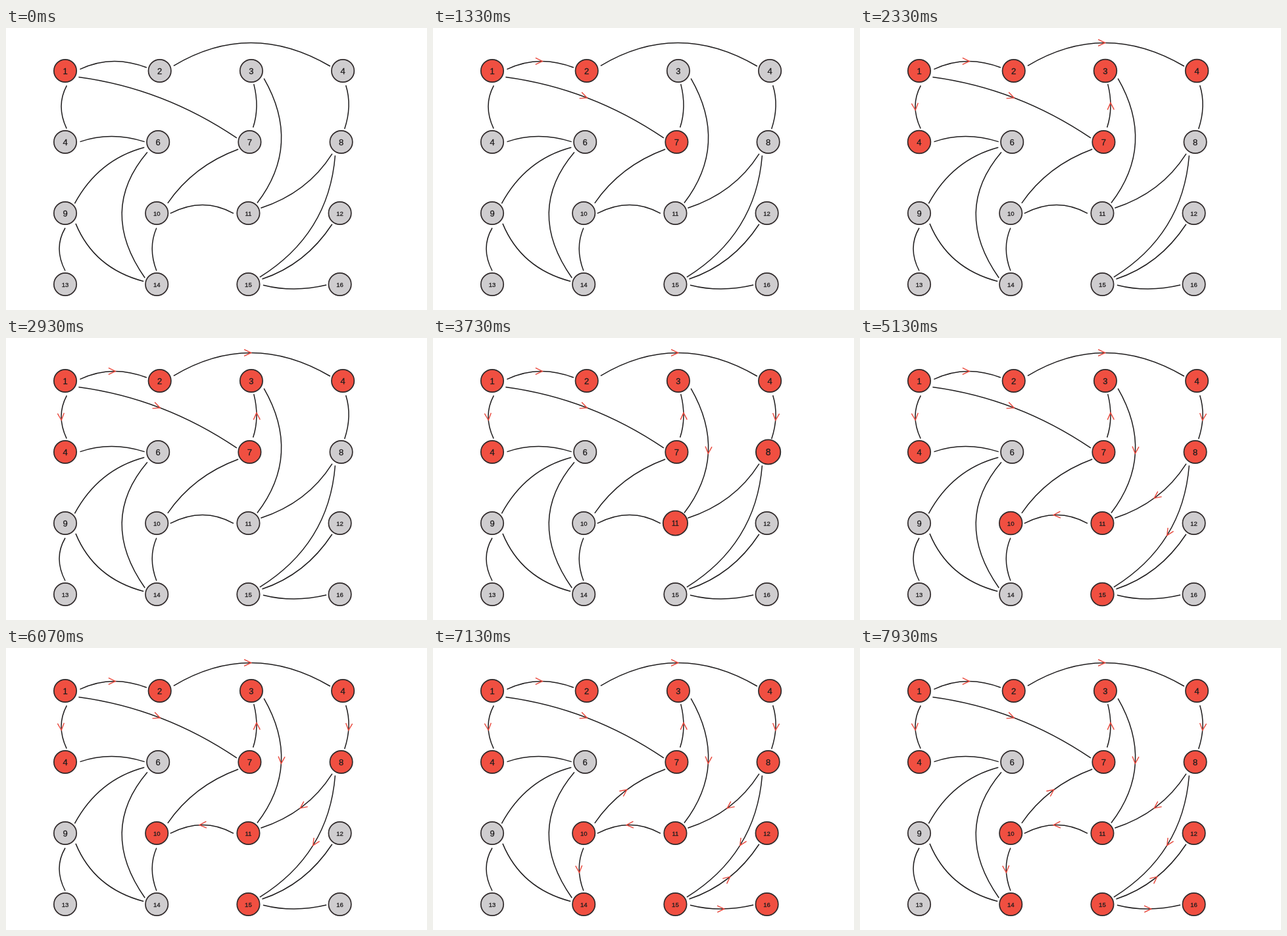
Recreate the animation shown at these times as an HTML page with a canvas. Size 640x428 px, loop 8000 ms.

```html
<!DOCTYPE html>
<html lang="en">
<head>
<meta charset="utf-8">
<title>Graph traversal</title>
<style>
html, body { margin: 0; width: 100%; height: 100%; overflow: hidden; background: #fff; }
canvas { display: block; width: 640px; height: 428px; }
</style>
</head>
<body>
<canvas id="stage"></canvas>
<script>
const canvas = document.getElementById('stage');
const ctx = canvas.getContext('2d');
const ratio = window.devicePixelRatio || 1;
canvas.width = 640 * ratio;
canvas.height = 428 * ratio;

const FPS = 15, TICKS = 120, PULSE = 6, GAP = 22.5;
const INK = '#1f1d1e', GREY = '#cfcdcf', RED = '#f04f41', ARROW = '#e8463a';

// Four by four grid; the upper rows lean slightly to the right.
const nodes = Array.from({ length: 16 }, (_, i) => {
  const row = i >> 2, col = i % 4;
  const lean = Math.max(0, 4.5 - 2.5 * row);
  return {
    label: i === 4 ? 4 : i + 1,
    x: 90 + (col && 139.2 * col + lean),
    y: 65 + 108 * row,
    start: i ? Infinity : -TICKS
  };
});

// Links are [from, to, bend, turn, skew]: bend in pixels to the left of the
// direction of travel, turn of both ends towards the bend in degrees.
const waves = [
  { start: 8, links: [[1, 2, 14.5, 10, -4], [1, 7, 13.6, -4]] },
  { start: 30, links: [[2, 4, 42.5, 20], [1, 5, -6, -6], [7, 3, -9.3, 12]] },
  { start: 52, links: [[3, 11, 47.8, 50, 10], [4, 8, 10.2, 13]] },
  { start: 77, links: [[8, 11, 17.8, 15], [8, 15, 33.4, 17, -8], [11, 10, -12.5, -1]] },
  { start: 101, links: [[10, 7, 12.6, 5], [10, 14, -7, 1], [15, 12, -18, 17], [15, 16, -7, 3]] },
  { start: Infinity, links: [[5, 6, 8.5, 1], [6, 9, -19.2, 12, 4], [6, 14, -54, 54, -8],
    [9, 14, -22.5, 16, -9], [9, 13, -9, 0]] }
];

function makeEdge([from, to, bend, turn, skew = 0], start) {
  const a = nodes[from - 1], b = nodes[to - 1];
  const angle = Math.atan2(b.y - a.y, b.x - a.x);
  const side = Math.sign(bend) * Math.PI / 180;
  const out = angle - side * (turn + skew);
  const back = angle + side * (turn - skew);
  const x0 = a.x + GAP * Math.cos(out), y0 = a.y + GAP * Math.sin(out);
  const x1 = b.x - (GAP - 2) * Math.cos(back), y1 = b.y - (GAP - 2) * Math.sin(back);
  const apexX = (a.x + b.x) / 2 + bend * Math.sin(angle);
  const apexY = (a.y + b.y) / 2 - bend * Math.cos(angle);
  b.start = Math.min(b.start, start);
  return {
    x0, y0, x1, y1, start,
    cx: 2 * apexX - (x0 + x1) / 2,
    cy: 2 * apexY - (y0 + y1) / 2,
    tip: .465 + 8 / Math.hypot(x1 - x0, y1 - y0)
  };
}

const edges = waves.flatMap(w => w.links.map(link => makeEdge(link, w.start)));

function drawEdge(e) {
  ctx.beginPath();
  ctx.moveTo(e.x0, e.y0);
  ctx.quadraticCurveTo(e.cx, e.cy, e.x1, e.y1);
  ctx.lineWidth = 1.5;
  ctx.strokeStyle = INK;
  ctx.stroke();
}

function drawArrow(e) {
  const t = e.tip, u = 1 - t;
  const point = (a, c, b) => u * u * a + 2 * u * t * c + t * t * b;
  const slope = (a, c, b) => u * (c - a) + t * (b - c);
  ctx.save();
  ctx.translate(point(e.x0, e.cx, e.x1), point(e.y0, e.cy, e.y1));
  ctx.rotate(Math.atan2(slope(e.y0, e.cy, e.y1), slope(e.x0, e.cx, e.x1)));
  ctx.beginPath();
  ctx.moveTo(-10.5, -5);
  ctx.lineTo(0, 0);
  ctx.lineTo(-10.5, 5);
  ctx.lineWidth = 1.4;
  ctx.strokeStyle = ARROW;
  ctx.stroke();
  ctx.restore();
}

// One quick swell when a node is reached.
function swell(age) {
  const p = (age + .5) / PULSE;
  return p > 0 && p < 1 ? 1 + .17 * Math.sin(Math.PI * p) ** 2 : 1;
}

function drawNode(n, tick) {
  const age = tick - n.start;
  const scale = swell(age);
  const small = n.label > 9;
  ctx.save();
  ctx.translate(n.x, n.y);
  ctx.scale(scale, scale);
  ctx.beginPath();
  ctx.arc(0, 0, 17.2, 0, Math.PI * 2);
  ctx.fillStyle = age >= 0 ? RED : GREY;
  ctx.fill();
  ctx.lineWidth = 1.7;
  ctx.strokeStyle = '#302a2b';
  ctx.stroke();
  ctx.font = (small ? 9.5 : 13) + 'px "Liberation Sans", Arial, sans-serif';
  ctx.textAlign = 'center';
  ctx.fillStyle = ctx.strokeStyle = INK;
  ctx.lineWidth = .3;
  const base = small ? 3.5 : 4.7;
  ctx.fillText(n.label, 0, base);
  ctx.strokeText(n.label, 0, base);
  ctx.restore();
}

function draw(now) {
  const tick = Math.floor(now * FPS / 1000 + .06) % TICKS;
  ctx.setTransform(ratio, 0, 0, ratio, 0, 0);
  ctx.fillStyle = '#fff';
  ctx.fillRect(0, 0, 640, 428);
  edges.forEach(drawEdge);
  edges.filter(e => tick >= e.start).forEach(drawArrow);
  nodes.forEach(n => drawNode(n, tick));
}

const begin = performance.now();
function loop() {
  draw(performance.now() - begin);
  requestAnimationFrame(loop);
}
loop();
</script>
</body>
</html>
```
